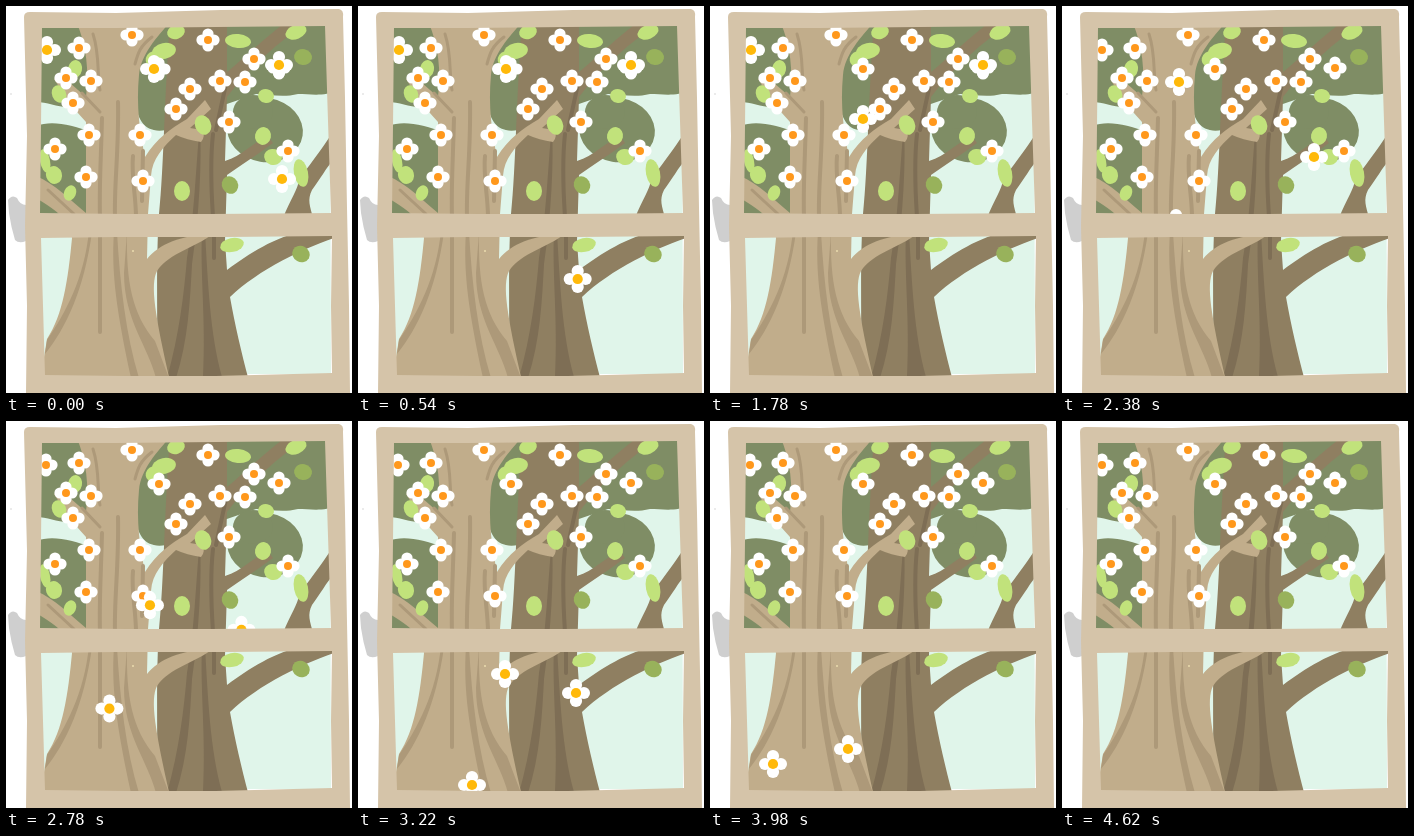
Animation, 346 px wide and 387 px high, one loop 4680 ms. Source, as an HTML page with a canvas:

```html
<!DOCTYPE html>
<html lang="en">
<head>
<meta charset="utf-8">
<title>Blossoms at the window</title>
<style>
html, body { margin: 0; width: 100%; height: 100%; overflow: hidden; background: #fff; }
canvas { display: block; width: 346px; height: 387px; }
</style>
</head>
<body>
<canvas id="stage" width="346" height="387"></canvas>
<script>
const W = 346, H = 387, LOOP = 4680, GONE = 4610;
const ctx = document.getElementById('stage').getContext('2d');

function fill(g, color, d, rule) {
  g.fillStyle = color;
  g.fill(new Path2D(d), rule || 'nonzero');
}

function stroke(g, color, width, d) {
  g.strokeStyle = color;
  g.lineWidth = width;
  g.lineCap = g.lineJoin = 'round';
  g.stroke(new Path2D(d));
}

function oval(g, color, x, y, rx, ry, tilt = 0) {
  g.fillStyle = color;
  g.beginPath();
  g.ellipse(x, y, rx, ry, tilt, 0, Math.PI * 2);
  g.fill();
}

function flower(g, x, y, big) {
  const reach = big ? 7.9 : 6, r = big ? 6.1 : 5.6;
  for (const [dx, dy] of [[1, 0], [0, 1], [-1, 0], [0, -1]])
    oval(g, '#fff', x + dx * reach, y + dy * reach, r, r);
  oval(g, '#fff', x, y, 6.5, 6.5);
  oval(g, big ? '#ffb90a' : '#ff981c', x, y, big ? 5.1 : 4, big ? 5.1 : 4);
}

function drawFoliage(g) {
  const green = '#7f8d65';
  fill(g, green, 'M30 15H100V94C84 97 74 94 66 101C52 102 42 96 30 96Z');
  fill(g, green, 'M30 120C46 114 66 119 84 126V212H30Z');
  fill(g, green, 'M128 15H330V84C320 91 304 88 292 88C276 92 262 88 250 88L215 100L160 124C140 128 130 114 130 94Z');
  oval(g, green, 259, 124, 38, 32, 0.15);
  oval(g, green, 247, 106, 20, 17);
}

function drawBackTree(g) {
  const bark = '#8f7f61', groove = '#7e6e55';
  fill(g, bark, `M164 15H221L221 66C236 54 255 35 281 15H303C273 36 243 61 221 91
    L219 155C236 150 246 137 262 130L267 137C251 149 235 159 221 169L219 235L221 264
    C244 247 267 232 300 224H334V230C299 241 252 264 224 291C229 319 235 345 243 375
    H150C153 320 149 265 153 208C158 160 158 95 164 15Z`);
  fill(g, bark, 'M328 124C315 145 300 163 293 174C292 183 284 194 277 212H307C304 200 301 194 306 184C315 172 320 162 328 153Z');
  fill(g, groove, 'M194 116C190 160 188 215 181 252C178 288 173 330 161 372H170C182 335 184 296 186 258C193 210 196 160 194 116Z');
  fill(g, groove, 'M196 226C194 268 200 313 197 371H216C204 328 202 277 199 226Z');
  stroke(g, groove, 4, 'M207 128C204 155 205 181 207 211M208 226V252M220 78L210 124');
}

function drawFrontTree(g) {
  const bark = '#c1ad8b', groove = '#ad9979';
  fill(g, bark, `M70 15H165C151 31 135 48 133 69C130 100 134 127 139 151
    C151 132 164 123 181 113L199 94L205 103L184 122L196 124Q200 130 195 136
    Q181 134 170 129C157 141 146 153 145 170L142 208L141 253C153 238 175 229 207 228
    C190 241 163 247 151 265C144 279 149 309 164 375H34L41 333C57 309 62 274 66 232
    C62 211 48 203 30 192V170C49 178 63 193 80 207L80 116C67 102 58 89 48 73
    L56 70L80 91C83 65 81 40 70 15Z`);
  fill(g, groove, 'M83 225C78 273 60 306 41 334L39 348C60 322 78 284 86 226Z');
  fill(g, groove, 'M108 226C105 267 111 307 125 372H133C120 329 114 279 111 226Z');
  fill(g, groove, 'M121 226C120 275 126 308 149 335L163 372H150C142 340 118 314 118 267Z');
  stroke(g, groove, 4, 'M96 112C95 153 93 183 94 211M94 230V326M112 96C113 145 108 178 109 211M127 150C125 170 130 190 130 211M137 145L136 195');
  stroke(g, groove, 3, 'M87 28C94 49 91 70 94 84M76 87L94 106M146 31C134 40 132 47 129 58M42 184L68 208');
  oval(g, '#eadcae', 127, 245, 1, 1);
}

function drawLeaves(g) {
  const light = '#c1e27b', mid = '#98b25b';
  const leaves = [
    [170, 26, 9, 7, -.3], [158, 45, 12, 8, -.2], [147, 53, 7, 8, .6],
    [232, 35, 13, 7, .1], [290, 26, 11, 7, -.4], [260, 90, 8, 7, .2],
    [257, 130, 8, 9, .2], [267, 151, 9, 8, .3], [295, 167, 7, 14, -.2],
    [197, 119, 8, 10, -.4], [176, 185, 8, 10, 0], [226, 239, 12, 7, -.2],
    [53, 88, 7, 9, -.4], [69, 63, 7, 9, .2], [39, 155, 5, 12, -.2],
    [48, 169, 8, 9, -.3], [64, 187, 6, 8, .4]
  ];
  oval(g, mid, 297, 51, 9, 8, .2);
  oval(g, mid, 224, 179, 8, 9, -.5);
  oval(g, mid, 295, 248, 9, 8, .5);
  for (const leaf of leaves) oval(g, light, ...leaf);
}

function drawBlossoms(g) {
  const spots = [
    [40, 44], [73, 42], [126, 29], [202, 34], [60, 72], [85, 75], [67, 97],
    [153, 63], [184, 83], [170, 103], [214, 75], [239, 76], [248, 53],
    [273, 62], [223, 116], [83, 129], [134, 129], [49, 143], [80, 171],
    [137, 175], [282, 145]
  ];
  for (const [x, y] of spots) flower(g, x, y, false);
}

function layer(paint) {
  const c = document.createElement('canvas');
  c.width = W;
  c.height = H;
  paint(c.getContext('2d'));
  return c;
}

const garden = layer(g => {
  g.fillStyle = '#fff';
  g.fillRect(0, 0, W, H);
  fill(g, '#cfcfcf', 'M2 194Q6 188 11 192Q14 199 20 199V235Q13 238 9 234Q5 221 3 207Z');
  oval(g, '#e4e4e4', 5, 88, 1, 1);
  fill(g, '#e0f5ea', 'M30 15H324L325 368H30Z');
  drawFoliage(g);
  drawBackTree(g);
  drawFrontTree(g);
  drawLeaves(g);
  drawBlossoms(g);
});

const frame = layer(g => fill(g, '#d5c4a9', `M18 11Q18 6 24 6L110 7L215 4L333 3Q338 4 337 11
  L339 92L341 202L343 300L344 387H20L21 300L19 220L21 130Z
  M36 22L35 120L34 207L120 208L205 208L325 207L322 115L319 20L210 21L110 22Z
  M35 232L37 300L39 369L120 370L210 370L326 367L325 300L326 230L220 231L110 231Z`, 'evenodd'));

// Each fall is a list of [time, x, y] keys.
const falls = [
  [[0, 276, 173], [200, 253, 217], [380, 233, 252], [550, 219, 274], [840, 202, 296],
   [1120, 186, 306], [1230, 158, 281], [1340, 117, 271], [1450, 76, 301], [1580, 51, 388]],
  [[1650, 148, 63], [1780, 153, 113], [1960, 147, 156], [2180, 132, 194], [2380, 114, 217],
   [2720, 104, 277], [2960, 105, 319], [3220, 114, 364], [3340, 118, 388]],
  [[2190, 41, 44], [2380, 117, 76], [2540, 138, 125], [2740, 143, 176], [2980, 148, 219],
   [3220, 147, 253], [3500, 111, 276], [3780, 58, 308], [3980, 63, 343], [4140, 55, 388]],
  [[1960, 273, 59], [2060, 281, 88], [2200, 273, 122], [2380, 252, 151], [2740, 237, 203],
   [3220, 218, 272], [3540, 191, 291], [3820, 163, 305], [3980, 138, 328],
   [4160, 88, 345], [4350, 40, 359], [4610, 33, 367]]
];

// Smooth curve through the keys, with slopes taken from the neighbours.
function along(keys, t) {
  const last = keys.length - 1;
  if (t <= keys[0][0]) return keys[0].slice(1);
  if (t >= keys[last][0]) return null;
  const i = keys.findIndex(k => k[0] > t) - 1;
  const a = keys[i], b = keys[i + 1], span = b[0] - a[0], u = (t - a[0]) / span;
  const slope = (n, axis) => {
    const p = keys[Math.max(0, n - 1)], q = keys[Math.min(last, n + 1)];
    return (q[axis] - p[axis]) / (q[0] - p[0]) * span;
  };
  return [1, 2].map(axis =>
    (1 + 2 * u) * (1 - u) ** 2 * a[axis] + u * (1 - u) ** 2 * slope(i, axis) +
    u * u * (3 - 2 * u) * b[axis] + u * u * (u - 1) * slope(i + 1, axis));
}

let start = null;
function draw(now) {
  if (start === null) start = now;
  const t = (now - start) % LOOP;
  ctx.drawImage(garden, 0, 0);
  if (t < GONE) {
    for (const keys of falls) {
      const spot = along(keys, t);
      if (spot) flower(ctx, spot[0], spot[1], true);
    }
  }
  ctx.drawImage(frame, 0, 0);
  requestAnimationFrame(draw);
}
requestAnimationFrame(draw);
</script>
</body>
</html>
```
